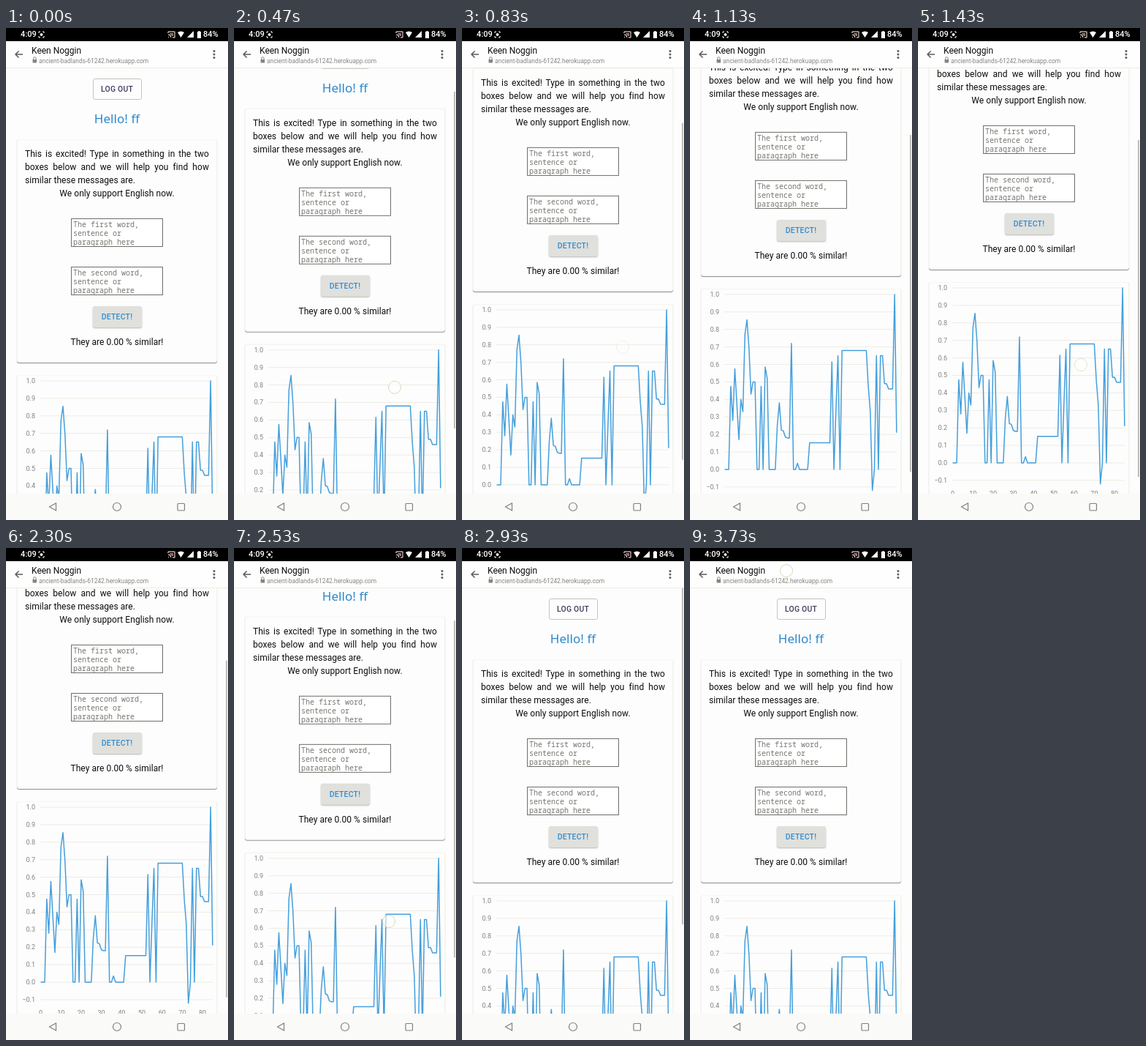
Write an HTML page that moves like this. It is 304 px wide and 672 px high and loops after 3760 ms.

```html
<!DOCTYPE html>
<html lang="en">
<head>
<meta charset="utf-8">
<title>Text similarity</title>
<style>
@property --s { syntax: "<number>"; inherits: true; initial-value: 0; }
html, body { margin: 0; width: 100%; height: 100%; overflow: hidden; background: #fdfdfd; }
.stage {
  position: relative; width: 304px; height: 672px; overflow: hidden;
  background: #fdfdfd; color: #0c0c0c; font: 12px/18px Roboto, sans-serif;
  animation: scroll 3.76s linear infinite;
}
.stage * { position: absolute; box-sizing: border-box; margin: 0; }
svg { left: 0; top: 0; overflow: visible; }
.page { inset: 0; transform: translateY(calc(var(--s) * -1px)); }
.card {
  left: 15px; width: 274px; border-radius: 3px; background: #fdfdfd;
  border: 1px solid #f6f6f0; box-shadow: 0 1px 1px #8c8c92;
}
.mid { left: 0; width: 304px; text-align: center; letter-spacing: .05px; }
.intro { left: 26px; top: 163px; width: 252px; text-align: justify; letter-spacing: .05px; }
h1 { top: 112px; font: 400 17px/24px "Noto Sans", sans-serif; color: #2b88cc; }
.btn {
  left: 118.5px; width: 67px; height: 29px; border-radius: 3px; text-align: center;
  font-size: 10.4px; line-height: 29.5px; font-weight: 500; letter-spacing: .25px;
}
.out { top: 69px; border: 1px solid #c4c4c0; line-height: 27.5px; color: #3c3c5c; }
.detect { top: 380px; background: #e0e0dc; color: #2f8bd0; box-shadow: 0 1px 2px #b4b4b0; }
.box {
  left: 89px; width: 126px; height: 39px; padding: 2px 0 0 2px; overflow: hidden;
  border: 1px solid #6e6e6a; background: #fff; color: #757570; white-space: pre;
  font: 10px/12px "Noto Sans Mono", "DejaVu Sans Mono", monospace;
}
.box span { left: 2px; top: 1px; }
.bar {
  left: 301px; top: 54px; width: 2px; height: 460px; background: #bcbcb8;
  transform: translateY(calc(var(--s) * .78px)); animation: bar 3.76s linear infinite;
}
.dot {
  width: 18px; height: 18px; margin: -9px 0 0 -9px; border-radius: 50%; opacity: 0;
  border: 1px solid #d8d6b8; background: #ffffff99; animation: 3.76s linear infinite;
}
.status { left: 0; top: 0; width: 304px; height: 18px; background: #000; color: #fff; font-size: 11px; font-weight: 500; }
.head { left: 0; top: 18px; width: 304px; height: 37px; background: #fefefe; border-bottom: 1px solid #eeeddc; }
.nav { left: 0; top: 636px; width: 304px; height: 36px; background: #fafaf8; }
.name { left: 35px; top: 22px; font-size: 12px; white-space: nowrap; }
.url { left: 45px; top: 36px; font-size: 8.4px; color: #858583; white-space: nowrap; }
@keyframes scroll {
  0%, 8% { --s: 0; }
  12.5% { --s: 42; }
  17% { --s: 75; }
  22.07% { --s: 97; }
  30% { --s: 118; }
  38.03% { --s: 127; }
  45%, 61.5% { --s: 128; animation-timing-function: cubic-bezier(.35, 0, .4, 1); }
  75%, 100% { --s: 0; }
}
@keyframes bar {
  0%, 8% { opacity: 0; }
  9%, 80% { opacity: 1; }
  88%, 100% { opacity: 0; }
}
@keyframes drag {
  0%, 7% { opacity: 0; }
  8%, 18% { opacity: 1; }
  24%, 100% { opacity: 0; }
}
@keyframes hold {
  0%, 34% { opacity: 0; }
  36%, 38% { opacity: .7; }
  42%, 100% { opacity: 0; }
}
@keyframes pull {
  0%, 61% { opacity: 0; }
  62.5%, 68% { opacity: 1; }
  71%, 100% { opacity: 0; }
}
@keyframes tap {
  0%, 96.5% { opacity: 0; }
  98%, 100% { opacity: 1; }
}
</style>
</head>
<body>
<div class="stage">
  <div class="page">
    <div class="btn out">LOG OUT</div>
    <h1 class="mid">Hello! ff</h1>
    <div class="card" style="top:152px;height:305px"></div>
    <p class="intro">This is excited! Type in something in the two boxes below and we will help you find how similar these messages are.</p>
    <p class="mid" style="top:217px">We only support English now.</p>
    <div class="box" style="top:260px"><span>The first word,
sentence or
paragraph here</span></div>
    <div class="box" style="top:326px"><span>The second word,
sentence or
paragraph here</span></div>
    <div class="btn detect">DETECT!</div>
    <p class="mid" style="top:420px">They are 0.00 % similar!</p>
    <div class="card" style="top:474px;height:306px"></div>
    <svg id="chart" width="304" height="800" font-family="Roboto, sans-serif" font-size="9" fill="#808080"></svg>
    <div class="dot" style="left:220px;top:533px;animation-name:drag"></div>
    <div class="dot" style="left:212px;top:568px;animation-name:pull"></div>
  </div>
  <div class="bar"></div>
  <div class="dot" style="left:223px;top:460px;animation-name:hold"></div>

  <div class="status">
    <span style="left:20px">4:09</span>
    <span style="left:270px">84%</span>
  </div>
  <div class="head"></div>
  <div class="name">Keen Noggin</div>
  <div class="url">ancient-badlands-61242.herokuapp.com</div>
  <div class="nav"></div>
  <svg width="304" height="672" fill="none">
    <g stroke="#fff">
      <path d="M45 7V5h2M50 5h2v2M52 11v2h-2M47 13h-2v-2"/>
      <circle cx="48.5" cy="9" r="1.5" fill="#fff"/>
      <path d="M222 7V5h9v8h-3M222 9q4 0 4 4M222 12l1 1"/>
    </g>
    <path fill="#c8605c" d="M224 7h5v4h-2q-1-2-3-3z"/>
    <path fill="#fff" d="M235 6q4.500-3 9 0l-4.500 7zM257 4v9h-9zM262 5h1.500V4h2v1H267v9h-5z"/>
    <path d="M23 36H13M17.500 31.500L13 36l4.500 4.500" stroke="#5c5c58" stroke-width="1.500"/>
    <path d="M37.500 43v-1.500a1.800 1.800 0 0 1 3.600 0V43" stroke="#858583"/>
    <path d="M36.500 43h5.500v4.500h-5.500z" fill="#858583"/>
    <g fill="#5c5c58"><circle cx="285" cy="31.500" r="1.500"/><circle cx="285" cy="36" r="1.500"/><circle cx="285" cy="40.500" r="1.500"/></g>
    <g stroke="#80807c" stroke-width="1.200">
      <path d="M68.500 649v10l-9-5z"/>
      <circle cx="152" cy="654" r="5.500"/>
      <rect x="235" y="649.500" width="9.500" height="9.500" rx="1"/>
    </g>
  </svg>
  <div class="dot" style="left:132px;top:31px;animation-name:tap"></div>
</div>
<script>
const run = (v, n) => Array(n).fill(v);
// similarity scores in percent
const scores = [
  0, 0, 0, 47.5, 28, 57.5, 38, 17, 40, 33,
  77, 85.5, 70, 43, 50, 50, 0, 0, 47.5, 0,
  58.5, 52, 0, 0, 0, 0, 25, 38, 22.5, 22,
  18.5, 18, 18, 72, 0, 0, 3.5, ...run(0, 5), ...run(15.2, 11),
  61.5, 0, 33, 65, 0, ...run(68, 13),
  47, 33, -12, 0, 65, 0, 65, 65, 49, 49, 46, 46, 46, 100, 21
];
const px = i => 47.5 + i * 2.77;
const py = v => 721 - v * 2.39;
const label = (x, y, anchor, text) => `<text x="${x}" y="${y}" text-anchor="${anchor}">${text}</text>`;

let out = "";
for (let v = -10; v <= 100; v += 10) {
  const y = py(v);
  out += `<path d="M47 ${y}H283" stroke="#ecebe4"/>`;
  out += label(40, y + 3, "end", (v / 100).toFixed(1).replace("-", "\u2212"));
}
for (let i = 0; i <= 80; i += 10) out += label(px(i), 766, "middle", i);
const points = scores.map((v, i) => px(i).toFixed(1) + "," + py(v).toFixed(1)).join(" ");
out += `<polyline points="${points}" fill="none" stroke="#459fdc" stroke-width="1.5" stroke-linejoin="round"/>`;
document.getElementById("chart").innerHTML = out;
</script>
</body>
</html>
```
